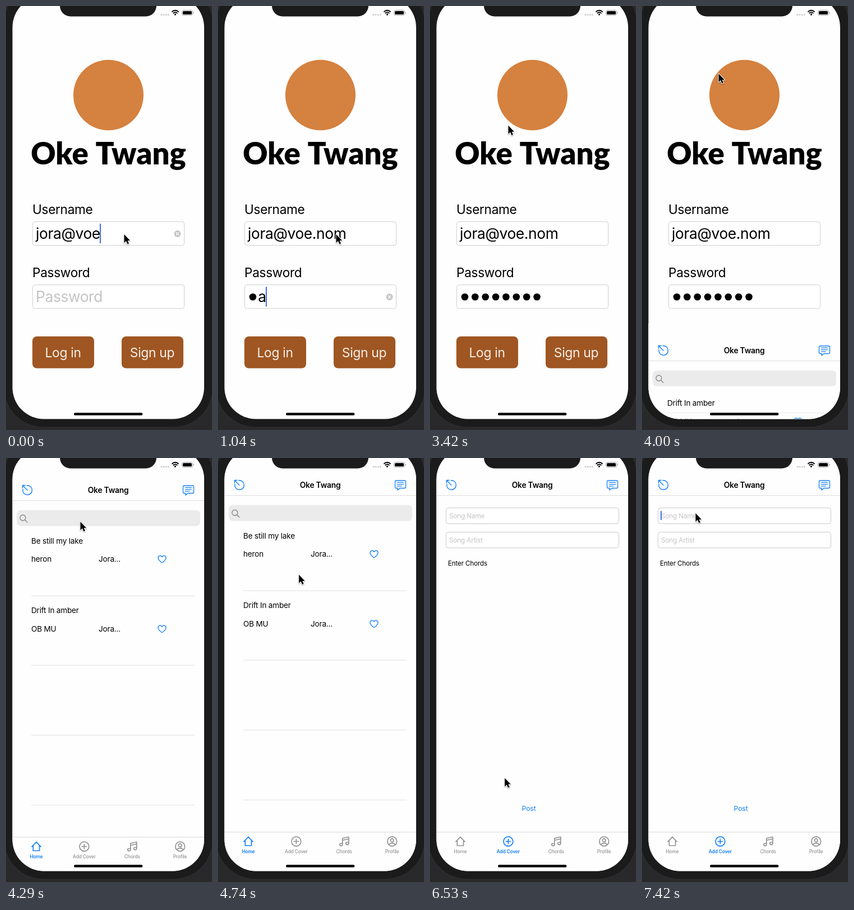
Write an HTML page with a canvas that moves like this. It is 367 px wide and 752 px high and loops after 8000 ms.

```html
<!DOCTYPE html>
<html lang="en">
<head>
<meta charset="utf-8">
<title>Login and song list</title>
<style>
  html, body { margin: 0; width: 100%; height: 100%; overflow: hidden; background: #1b1b1b; }
  canvas { display: block; width: 367px; height: 752px; }
</style>
</head>
<body>
<canvas id="stage"></canvas>
<script>
const W = 367, H = 752, LOOP = 8000, TICK = 148.4, LEAD = 14;
const BLUE = '#1480f8', GRAY = '#929292', BROWN = '#9f5622', HINT = '#c4c4c6';
const APP = 'Oke Twang', EMAIL = 'jora@voe', SECRET = 'password';

const canvas = document.getElementById('stage');
const ctx = canvas.getContext('2d');
const dpr = window.devicePixelRatio || 1;
canvas.width = W * dpr;
canvas.height = H * dpr;

// Pointer path: [tick, x, y]
const POINTER = [
  [13, 210, 406], [14, 200, 422], [15, 165, 510], [16, 121, 598], [17, 109, 616],
  [19, 109, 616], [20, 124, 400], [21, 139, 213], [23, 139, 213], [25, 137, 142],
  [27, 136, 121], [29, 132, 114], [31, 134, 122], [34, 163, 380], [37, 179, 616],
  [38, 153, 655], [39, 140, 673], [43, 140, 673], [46, 118, 360], [49, 96, 110], [50, 95, 99]
];

function pointerAt(n) {
  let a = POINTER[0];
  for (const b of POINTER) {
    if (n <= b[0]) {
      const k = b === a ? 0 : Math.max(0, (n - a[0]) / (b[0] - a[0]));
      return [a[1] + (b[1] - a[1]) * k, a[2] + (b[2] - a[2]) * k];
    }
    a = b;
  }
  return [a[1], a[2]];
}

function rect(x, y, w, h, r, fill, stroke) {
  ctx.beginPath();
  ctx.roundRect(x, y, w, h, r);
  if (fill) { ctx.fillStyle = fill; ctx.fill(); }
  if (stroke) { ctx.strokeStyle = stroke; ctx.lineWidth = 1; ctx.stroke(); }
}

function disc(x, y, r, fill) {
  ctx.beginPath();
  ctx.arc(x, y, r, 0, Math.PI * 2);
  ctx.fillStyle = fill;
  ctx.fill();
}

function rule(x1, x2, y, color) {
  ctx.fillStyle = color;
  ctx.fillRect(x1, y, x2 - x1, 1);
}

function text(str, x, y, size, color = '#000', weight = 400, align = 'left', family = 'Inter') {
  ctx.font = `${weight} ${size}px ${family}, "Liberation Sans", sans-serif`;
  ctx.letterSpacing = family === 'Inter' ? `${-0.015 * size}px` : '0px';
  ctx.textAlign = align;
  ctx.fillStyle = color;
  ctx.fillText(str, x, y);
  return ctx.measureText(str).width;
}

// Stroked icon drawn around its own centre
function icon(d, x, y, color, width = 1.5) {
  ctx.save();
  ctx.translate(x, y);
  ctx.strokeStyle = color;
  ctx.lineWidth = width;
  ctx.lineCap = ctx.lineJoin = 'round';
  ctx.stroke(new Path2D(d));
  ctx.restore();
}

const ICONS = {
  back: 'M-.8 -8.2A8.3 8.3 0 1 1 -8 -1.5M0 0L-8.3 -8.3M-8.5 -3.6V-8.5H-3.6',
  chat: 'M-7.5 -8H7.5Q9.5 -8 9.5 -6V3.5Q9.5 5.5 7.5 5.5H-1L-5 9V5.5H-7.5Q-9.5 5.5 -9.5 3.5V-6Q-9.5 -8 -7.5 -8ZM-5.5 -4.7H5.5M-5.5 -1.4H5.5M-5.5 1.9H2',
  search: 'M4 -1A5 5 0 1 1 -6 -1A5 5 0 1 1 4 -1M2.7 2.7L7 7',
  heart: 'M0 6.5C-3 4.2 -7 1.4 -7 -2.3C-7 -6.8 -1.6 -7.6 0 -3.8C1.6 -7.6 7 -6.8 7 -2.3C7 1.4 3 4.2 0 6.5Z',
  home: 'M-8 .3L0 -7.8L8 .3M-5.6 -1.5V7.5H5.6V-1.5',
  add: 'M8.4 0A8.4 8.4 0 1 1 -8.4 0A8.4 8.4 0 1 1 8.4 0M-4 0H4M0 -4V4',
  notes: 'M-3 5.5V-5.5L8 -8V3.5M-3 -2L8 -4.5M-3 5.7A2.5 2.2 0 1 1 -8 5.7A2.5 2.2 0 1 1 -3 5.7M8 3.7A2.5 2.2 0 1 1 3 3.7A2.5 2.2 0 1 1 8 3.7',
  person: 'M8.4 0A8.4 8.4 0 1 1 -8.4 0A8.4 8.4 0 1 1 8.4 0M2.8 -2A2.8 2.8 0 1 1 -2.8 -2A2.8 2.8 0 1 1 2.8 -2M-5.2 6C-4 2.2 4 2.2 5.2 6',
  wifi: 'M-5.5 -2Q0 -6.4 5.5 -2M-3.3 .6Q0 -2 3.3 .6'
};

function caret(x, y, h, alpha = 1) {
  ctx.globalAlpha = alpha;
  ctx.fillStyle = '#426fe0';
  ctx.fillRect(Math.floor(x), y, 2, h);
  ctx.globalAlpha = 1;
}

function clearButton(y) {
  disc(305.5, y, 6, '#c5c5c7');
  icon('M-2.2 -2.2L2.2 2.2M2.2 -2.2L-2.2 2.2', 305.5, y, '#fff', 1.3);
}

function button(label, x, alpha) {
  rect(x, 586, 110, 56.5, 8, BROWN);
  ctx.globalAlpha = alpha;
  text(label, x + 54.5, 623, 22.9, '#f6f0eb', 400, 'center');
  ctx.globalAlpha = 1;
}

function secretField(n) {
  const typed = Math.max(0, Math.min(8, n - 5));
  const active = n >= 4 && n < 23;
  let end = 53;
  if (!typed) text('Password', 53, 525, 26.4, HINT);
  else {
    const shown = n >= 19 ? 8 : typed - 1;
    for (let i = 0; i < shown; i++) disc(62 + i * 18.36, 516, 6.3, '#000');
    end = 53 + shown * 18.36;
    if (shown < typed) end += text(SECRET[typed - 1], end, 525, 26.4);
  }
  if (!active) return;
  caret(end, 498, 35, n === 17 ? 0.55 : 1);
  if (typed) clearButton(516);
}

function login(n) {
  disc(182.5, 158, 62.5, '#d5813f');
  text(APP, 182.5, 281, 54.5, '#000', 900, 'center', 'Lato');

  text('Username', 47, 369, 22.7);
  rect(47.5, 382.5, 270, 42, 4, '#fff', '#cfcfcf');
  const suffix = ['', '.', '.no', '.nom'][Math.min(n, 3)];
  const width = text(EMAIL + suffix, 53, 413, 26.4);
  if (n < 4) {
    caret(53 + width, 386, 35);
    clearButton(404);
  }

  text('Password', 47, 481, 22.7);
  rect(47.5, 494.5, 270, 42, 4, '#fff', '#cfcfcf');
  secretField(n);

  button('Log in', 47, n === 18 ? 0.3 : n === 19 ? 0.7 : 1);
  button('Sign up', 206, 1);
}

function song(title, artist, y) {
  text(title, 45, y, 13.6);
  text(artist, 45, y + 32.5, 13.6);
  text('Jora...', 165, y + 32.5, 13.6);
  icon(ICONS.heart, 278, y + 28, BLUE, 1.3);
}

function songList(loaded) {
  rect(19, 83.5, 327, 28, 7, '#ebebeb');
  icon(ICONS.search, 31, 98, '#858585', 1.3);
  if (!loaded) {
    song('Drift In amber', 'OB MU', 146);
    rule(45, 336, 158, '#e6e6e6');
    return;
  }
  song('Be still my lake', 'heron', 142.5);
  song('Drift In amber', 'OB MU', 266.2);
  for (let i = 0; i < 4; i++) rule(45, 336, Math.round(234.6 + i * 123.7), '#e2e2e2');
}

function addCover(focused) {
  ['Song Name', 'Song Artist'].forEach((hint, i) => {
    const y = 88.5 + i * 43;
    rect(28.5, y, 308, 28, 4, '#fff', '#cacaca');
    text(hint, 34, y + 18, 11.8, HINT);
  });
  if (focused) caret(33.5, 94, 16);
  text('Enter Chords', 32, 191, 11.7);
  text('Post', 176, 626, 12.3, BLUE, 400, 'center');
}

function tabBar(active) {
  rule(12, 353, 663, '#d9d9d9');
  const tabs = [['Home', 'home'], ['Add Cover', 'add'], ['Chords', 'notes'], ['Profile', 'person']];
  tabs.forEach(([label, name], i) => {
    const x = 54 + i * 85.4, color = i === active ? BLUE : GRAY;
    icon(ICONS[name], x, 680, color, 1.7);
    text(label, x, 701.3, 8.3, color, i === active ? 600 : 500, 'center');
  });
}

// The main screen rises over the login on a critically damped spring
function main(n) {
  const u = (n * TICK - 3956) * 0.01833;
  if (u < 0) return;
  const adding = n >= 43;
  ctx.save();
  ctx.translate(0, Math.round(740 * (1 + u) * Math.exp(-u)));
  ctx.fillStyle = '#fefefe';
  ctx.fillRect(11, 0, 343, H);
  icon(ICONS.back, 38, 48, BLUE, 1.4);
  icon(ICONS.chat, 325, 48, BLUE, 1.3);
  text(APP, 182, 53, 13.8, '#000', 600, 'center');
  rule(12, 353, 66, '#dcdcdc');
  if (adding) addCover(n >= 50);
  else songList(n >= 28);
  tabBar(adding ? 1 : 0);
  ctx.restore();
}

function statusBar() {
  for (let i = 0; i < 4; i++) disc(277 + i * 4.1, 15.5, 1.6, '#cfcfcf');
  icon(ICONS.wifi, 301.5, 12, '#000', 1.9);
  disc(301.5, 15, 1.6, '#000');
  rect(313.5, 7.5, 19, 9, 2.8, null, '#a5a5a5');
  rect(315, 9, 16, 6, 1.5, '#000');
  rect(333.5, 10.5, 1.3, 3, 0.6, '#a5a5a5');
}

function pointer(n) {
  const [x, y] = pointerAt(n);
  ctx.save();
  ctx.translate(x, y - 1);
  const arrow = new Path2D('M0.5 0V15L4 11.8L6.4 17.2L9 16L6.7 10.9H11Z');
  ctx.lineJoin = 'round';
  ctx.lineWidth = 2;
  ctx.strokeStyle = '#fff';
  ctx.shadowColor = 'rgba(0,0,0,.35)';
  ctx.shadowBlur = 2 * dpr;
  ctx.shadowOffsetY = dpr;
  ctx.stroke(arrow);
  ctx.shadowColor = 'transparent';
  ctx.fillStyle = '#000';
  ctx.fill(arrow);
  ctx.restore();
}

function draw(n) {
  ctx.setTransform(dpr, 0, 0, dpr, 0, 0);
  ctx.fillStyle = '#29292b';
  ctx.fillRect(0, 0, W, H);
  rect(-3.5, -40, 372, 787, 70, '#1b1b1b', '#303032');

  ctx.save();
  rect(11.5, -18, 341.5, 750.5, 56, '#fefefe');
  ctx.clip();
  login(n);
  main(n);
  statusBar();
  rect(121, 721.5, 122.5, 4.5, 2.2, '#000');
  ctx.restore();

  rect(96, -30, 172, 48.5, 19, '#1b1b1b');
  pointer(n);
}

function loop(now) {
  draw(Math.floor((now % LOOP + LEAD) / TICK));
  requestAnimationFrame(loop);
}
requestAnimationFrame(loop);
</script>
</body>
</html>
```
